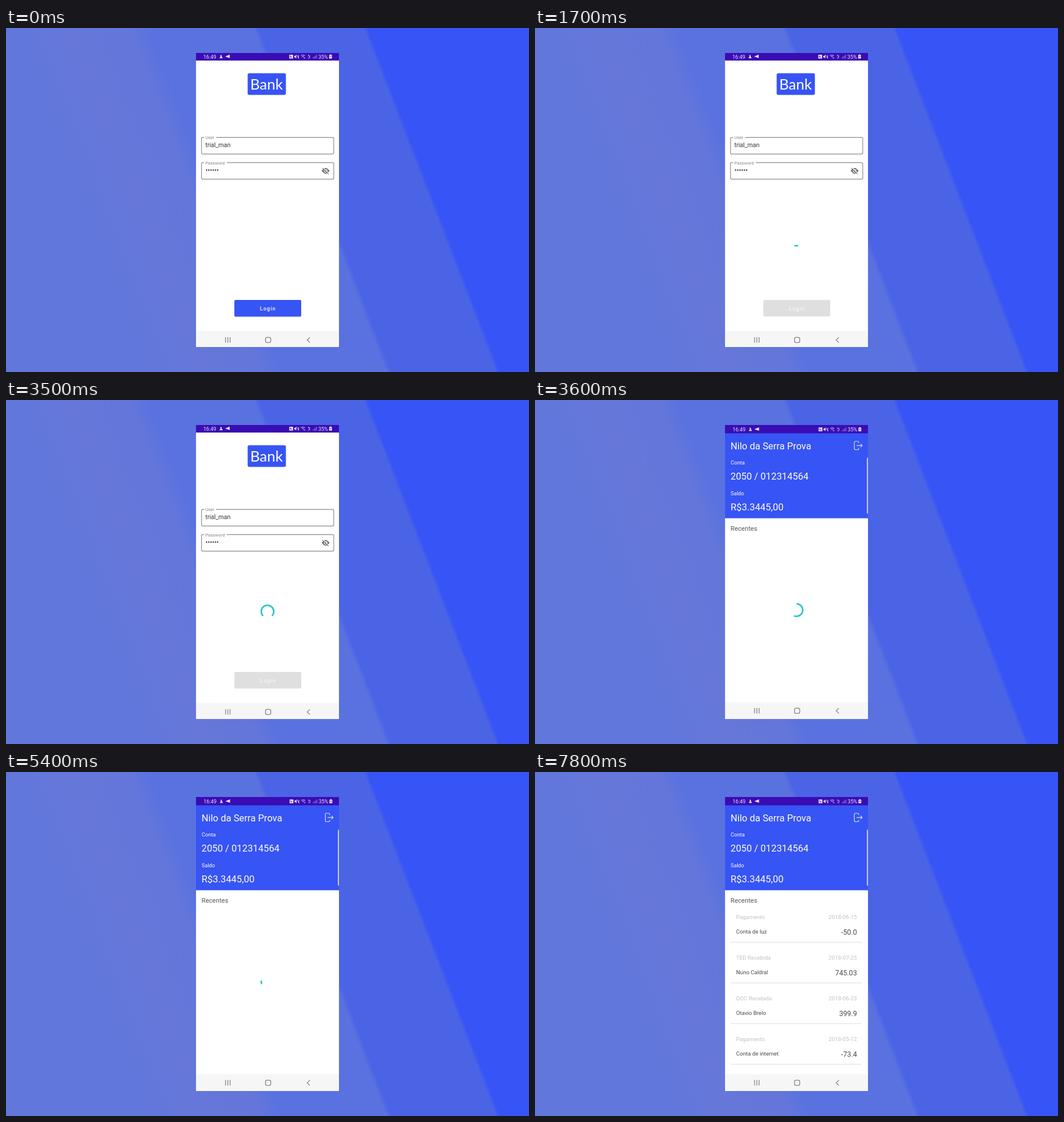
These frames come from a looping animation (900x592 px, 8 s). An HTML page:

```html
<!DOCTYPE html>
<html lang="pt">
<head>
<meta charset="utf-8">
<title>Bank login</title>
<style>
  html, body { margin: 0; width: 100%; height: 100%; overflow: hidden; }
  svg { display: block; width: 900px; height: 592px; font-family: Roboto, sans-serif; }
  .bar { fill: #3a0cb4; }
  .blue { fill: #3754f4; }
  .line { fill: none; stroke: #8b8b8b; stroke-width: 1.2; }
  .label { font-size: 7.6px; fill: #858585; }
  .small { font-size: 9.1px; }
  .big { font-size: 16.35px; }
  .faint { font-size: 9.7px; fill: #c2c2c2; }
  .item { font-size: 9.6px; fill: #484848; }
  .sum { font-size: 12.2px; fill: #484848; }
  .end { text-anchor: end; }
  .nav { fill: none; stroke: #858585; stroke-width: 1.3; }
  #spin { fill: none; stroke: #1fc5c0; stroke-width: 2.5; }
</style>
</head>
<body>
<svg viewBox="0 0 900 592">
  <defs>
    <linearGradient id="sky" gradientUnits="userSpaceOnUse" x1="0" y1="0" x2="784" y2="-302">
      <stop offset="0" stop-color="#6177db"/>
      <stop offset=".12" stop-color="#6677d9"/>
      <stop offset=".235" stop-color="#6476da"/>
      <stop offset=".27" stop-color="#5a72e0"/>
      <stop offset=".473" stop-color="#5a72e0"/>
      <stop offset=".483" stop-color="#4b64e6"/>
      <stop offset=".683" stop-color="#4b64e6"/>
      <stop offset=".691" stop-color="#3754f6"/>
    </linearGradient>

    <g id="status" fill="#e9e2fa" font-size="9">
      <text x="339.5" y="52.5">16:49</text>
      <path d="M369 46l2 1v2l2 3h-6l2-2zM377 49l8-3.2v6z"/>
      <path d="M487.5 46h6.500v6.500h-6.500zM496 48h1.500l2-2v6.500l-2-2h-1.500z"/>
      <g fill="none" stroke="#e9e2fa">
        <path d="M489.500 47.500v2.500h2.500" stroke="#3a0cb4"/>
        <path d="M500.500 46.500l3 5.500m0-5.500v6" stroke-width=".9"/>
        <path d="M507.500 47.500q3.500-2 7 0m-5.500 2q2-1.200 4 0m-1 2h3" stroke-width=".9"/>
        <path d="M520.500 46v3m2-2v5m-2-1v1.500" stroke-width=".9"/>
        <path d="M528.500 52.500v-2m2 2v-3.500m2 3.500v-5m2 5v-6.500" stroke-width=".9" opacity=".6"/>
      </g>
      <text x="537.500" y="52.500">35%</text>
      <path d="M557.500 45.500h2v1h1.500v6h-5v-6h1.500z"/>
      <path d="M556.500 49h4" stroke="#3a0cb4" stroke-width=".7"/>
    </g>

    <g id="nav" class="nav">
      <path d="M377.800 532v9.500m3.900-9.500v9.500m3.900-9.500v9.500"/>
      <rect x="446.600" y="532.300" width="9" height="9" rx="2.600"/>
      <path d="M522.800 532.500l-4.500 4.400 4.500 4.400"/>
    </g>
  </defs>

  <rect width="900" height="592" fill="url(#sky)"/>
  <rect x="327" y="43" width="246" height="506" fill="#fff"/>

  <g id="login">
    <rect class="bar" x="327" y="43" width="246" height="13"/>
    <use href="#status"/>
    <rect class="blue" x="416" y="78" width="65.500" height="37" rx="2.500" stroke="#6f85f2" stroke-width=".7"/>
    <text x="448.300" y="106" text-anchor="middle" fill="#fff" font-size="25.500" style="font-family: Lato, sans-serif">Bank</text>

    <path class="line" d="M341 188.300h-2.500a2 2 0 0 0-2 2v24.500a2 2 0 0 0 2 2h223.500a2 2 0 0 0 2-2v-24.500a2 2 0 0 0-2-2H361.500"/>
    <text class="label" x="343" y="191.200">User</text>
    <text x="343" y="205" font-size="10.500" fill="#333">trial_man</text>

    <path class="line" d="M341 231.600h-2.500a2 2 0 0 0-2 2v24.500a2 2 0 0 0 2 2h223.500a2 2 0 0 0 2-2v-24.500a2 2 0 0 0-2-2H380"/>
    <text class="label" x="343" y="234.700">Password</text>
    <path d="M345.200 244.500h20" stroke="#333" stroke-width="2.400" stroke-linecap="round" stroke-dasharray="0 3.800"/>
    <g fill="none" stroke="#6a6a6a">
      <path d="M543.800 245.800q6.200-9 12.400 0q-6.200 9-12.400 0z" fill="#6a6a6a"/>
      <circle cx="550" cy="245.800" r="2.600" stroke="#fff" stroke-width="1.100"/>
      <path d="M545.300 240.300l10.400 10.400" stroke="#fff" stroke-width="1.300"/>
      <path d="M544.500 240.900l10.400 10.400" stroke-width="1.200"/>
    </g>

    <rect id="shade" x="393" y="469" width="115" height="28.500" rx="2.500" fill="#c5cbe8"/>
    <rect id="button" x="393" y="468" width="115" height="28.500" rx="2"/>
    <text id="caption" x="450.800" y="486" text-anchor="middle" font-size="9" font-weight="500" letter-spacing="1">Login</text>

    <rect x="327" y="521.500" width="246" height="27.500" fill="#f6f6f6"/>
    <use href="#nav"/>
  </g>

  <g id="account">
    <rect class="blue" x="327" y="57" width="246" height="146.500"/>
    <rect class="bar" x="327" y="43" width="246" height="14.300"/>
    <use href="#status" x=".5" y="1.300"/>
    <g fill="#fff">
      <text class="big" x="336.500" y="84.500">Nilo da Serra Prova</text>
      <text class="small" x="336.800" y="111">Conta</text>
      <text class="big" x="336.500" y="137">2050 / 012314564</text>
      <text class="small" x="336.800" y="163.500">Saldo</text>
      <text class="big" x="336.500" y="189.500">R$3.3445,00</text>
    </g>
    <path d="M557 74v-1a2 2 0 0 0-2-2h-3.500a2 2 0 0 0-2 2v10.500a2 2 0 0 0 2 2h3.500a2 2 0 0 0 2-2v-1M553.500 78.300h9.500m-2.800-2.800l2.800 2.800-2.800 2.800" fill="none" stroke="#d5dcff" stroke-width="1.200"/>
    <path d="M573 99q-2 0-2 3v91q0 3 2 3z" fill="#c9cbe0"/>
    <text x="336.600" y="225" font-size="11.100" fill="#555">Recentes</text>
    <g id="list"></g>
    <rect x="327" y="520" width="246" height="29" fill="#f6f6f6"/>
    <use href="#nav" y="-2"/>
  </g>

  <circle id="spin" r="10.800" pathLength="360"/>
</svg>

<script>
const LOOP = 8000, STEP = 100, CYCLE = 1333;
const $ = id => document.getElementById(id);
const show = (id, on) => $(id).setAttribute('display', on ? 'inline' : 'none');

const rows = [
  ['Pagamento', '2018-06-15', 'Conta de luz', '-50.0'],
  ['TED Recebida', '2018-07-25', 'Nuno Caldral', '745.03'],
  ['DOC Recebida', '2018-06-23', 'Otavio Brelo', '399.9'],
  ['Pagamento', '2018-05-12', 'Conta de internet', '-73.4']
];
$('list').innerHTML = rows.map(([kind, date, what, sum], i) => `
  <g transform="translate(0 ${i * 70})">
    <text class="faint" x="346" y="252.800">${kind}</text>
    <text class="faint end" x="554" y="252.800">${date}</text>
    <text class="item" x="346" y="277.700">${what}</text>
    <text class="sum end" x="554" y="280">${sum}</text>
    <path d="M337 293H562" stroke="#e9e9e9" stroke-width="1.600"/>
  </g>`).join('');

// cubic-bezier(.4, 0, .2, 1), solved by bisection
function ease(x) {
  if (x <= 0) return 0;
  if (x >= 1) return 1;
  let lo = 0, hi = 1, s;
  for (let i = 0; i < 20; i++) {
    s = (lo + hi) / 2;
    const bx = 1.2 * s * (1 - s) ** 2 + .6 * s * s * (1 - s) + s ** 3;
    if (bx < x) lo = s; else hi = s;
  }
  return 3 * s * s * (1 - s) + s ** 3;
}

// Indeterminate ring: the head runs ahead, then the tail catches up
function ring(age, turn, cy) {
  const p = age % CYCLE / CYCLE;
  const base = age * 720 / 4444 + p * 90 + turn;
  const head = base + 270 * ease(p * 2);
  const tail = base + 270 * ease(p * 2 - 1);
  const len = Math.max(head - tail, 34);
  const from = (head + tail - len) / 2 - 90;
  $('spin').setAttribute('transform', `translate(450 ${cy}) rotate(${from})`);
  $('spin').setAttribute('stroke-dasharray', `${len} 360`);
}

function loginAge(t) {
  if (t < 1200) return t - 500;
  if (t < 1400) return 700;
  if (t < 3200) return Math.min(t, 1700) - 500;
  return 3000 + (t - 3200) * 1.1;
}
const accountAge = t => 3500 + Math.max(0, Math.min(t, 4100) - 3700) * .76;

function draw(time) {
  const t = Math.floor(time % LOOP / STEP) * STEP;
  const inside = t >= 3600, pressed = t >= 500, off = t >= 600;
  show('login', !inside);
  show('account', inside);
  show('list', t >= 6000);
  show('spin', off && t < 6000);
  show('shade', !off);
  $('button').setAttribute('fill', off ? '#dfdfdf' : pressed ? '#5f76f6' : '#3754f4');
  $('caption').setAttribute('fill', off ? '#f7f7f7' : '#fff');
  if (inside) ring(accountAge(t), 32, 361.5);
  else if (off) ring(loginAge(t), 0, 364);
}

let start;
function tick(now) {
  start ??= now;
  draw(now - start);
  requestAnimationFrame(tick);
}
draw(0);
requestAnimationFrame(tick);
</script>
</body>
</html>
```
